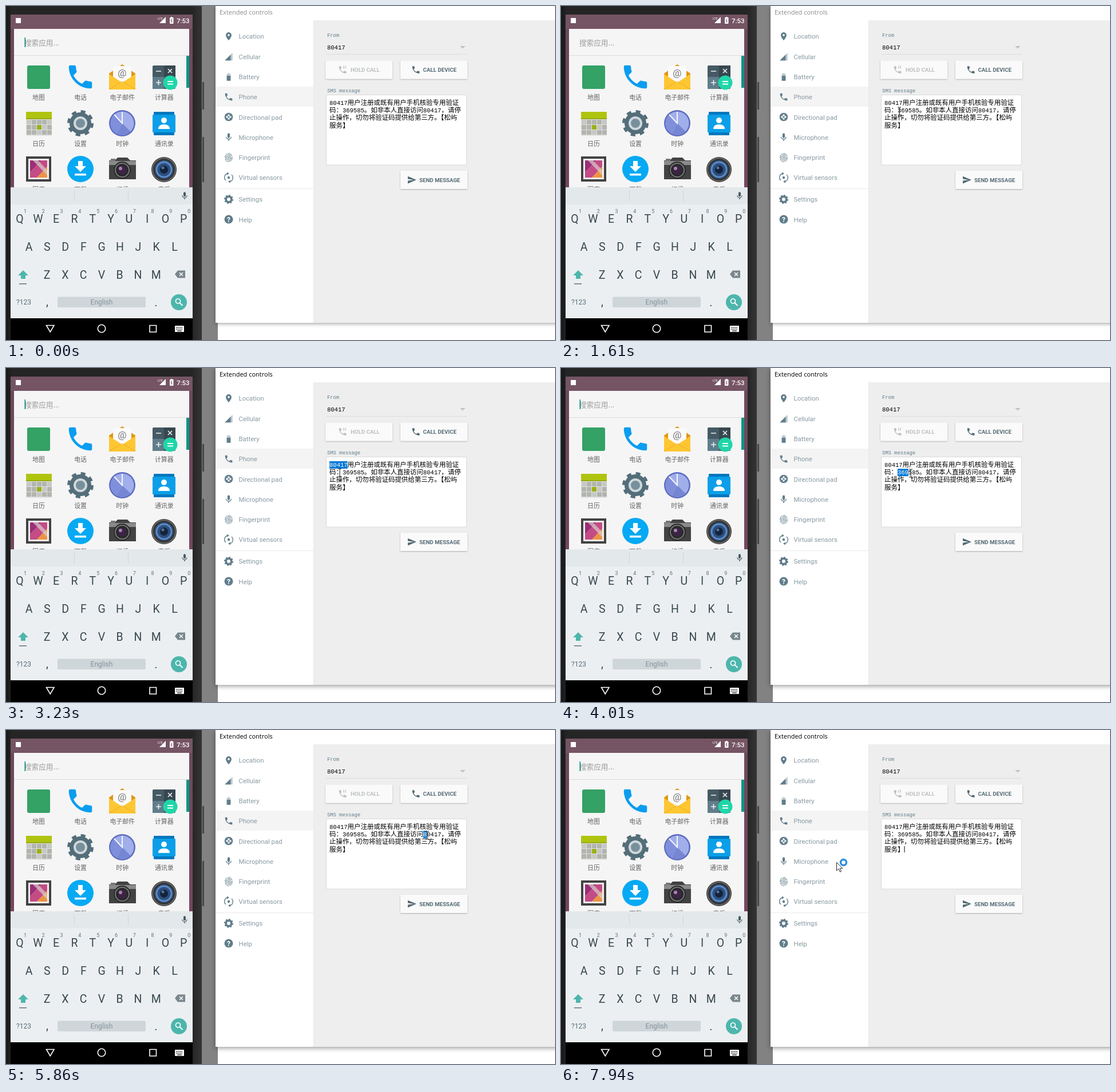
An HTML page for the animation above (8 s loop, 959 by 584 pixels).

```html
<!DOCTYPE html>
<html lang="zh">
<head>
<meta charset="utf-8">
<title>Extended controls</title>
<style>
html, body { margin: 0; width: 100%; height: 100%; overflow: hidden; background: #fff; }
svg { display: block; }
text { font-family: Roboto, "Noto Sans CJK SC", "Noto Sans CJK", sans-serif; white-space: pre; }
.cjk { font-family: "Noto Sans CJK SC", "Noto Sans CJK", sans-serif; }
.mono { font-family: "Liberation Mono", monospace; }
.title { font-family: "Open Sans", "Noto Sans", sans-serif; }
.sms { font-size: 11.45px; }
.sms .mono { font-size: 10.5px; }
</style>
</head>
<body>
<svg id="stage" width="959" height="584" viewBox="0 0 959 584" xmlns="http://www.w3.org/2000/svg"></svg>
<script>
const LOOP = 8000, WIDE = 11.45, NARROW = 6.3, LEFT = 565;

const glyphs = {
  phone: 'M6.62 10.79c1.44 2.83 3.76 5.14 6.59 6.59l2.2-2.2c.27-.27.67-.36 1.02-.24 1.12.37 2.33.57 3.57.57.55 0 1 .45 1 1V20c0 .55-.45 1-1 1C10.61 21 3 13.39 3 4c0-.55.45-1 1-1h3.5c.55 0 1 .45 1 1 0 1.25.2 2.45.57 3.57.11.35.03.74-.25 1.02z',
  pin: 'M12 2C8.13 2 5 5.13 5 9c0 5.25 7 13 7 13s7-7.75 7-13c0-3.87-3.13-7-7-7zm0 9.5a2.5 2.5 0 1 1 0-5 2.5 2.5 0 0 1 0 5z',
  mic: 'M12 14a3 3 0 0 0 3-3V5a3 3 0 0 0-6 0v6a3 3 0 0 0 3 3zm5.3-3c0 3-2.54 5.1-5.3 5.1S6.7 14 6.7 11H5c0 3.41 2.72 6.23 6 6.72V21h2v-3.28c3.28-.48 6-3.3 6-6.72z',
  send: 'M2 21l21-9L2 3v7l15 2-15 2z',
  cell: 'M2 22h20V2z',
  cellFull: 'M2 22h15V7z',
  battery: 'M10 2h4v2h3v18H7V4h3z',
  batteryFull: 'M7 9h10v13H7z',
  pause: 'M14 3h2v8h-2zM19 3h2v8h-2z'
};

const rect = (x, y, w, h, fill, more = '') => `<rect x="${x}" y="${y}" width="${w}" height="${h}" fill="${fill}" ${more}/>`;
const disc = (x, y, r, fill, more = '') => `<circle cx="${x}" cy="${y}" r="${r}" fill="${fill}" ${more}/>`;
const ring = (x, y, r, color, w, more = '') => disc(x, y, r, 'none', `stroke="${color}" stroke-width="${w}" ${more}`);
const path = (d, fill, more = '') => `<path d="${d}" fill="${fill}" ${more}/>`;
const line = (d, color, w = 1, more = '') => path(d, 'none', `stroke="${color}" stroke-width="${w}" ${more}`);
const text = (x, y, s, size, fill, more = '') => `<text x="${x}" y="${y}" font-size="${size}" fill="${fill}" ${more}>${s}</text>`;
const mid = 'text-anchor="middle"';
const glyph = (name, cx, cy, size, fill) =>
  `<g transform="translate(${cx - size / 2} ${cy - size / 2}) scale(${size / 24})">${path(glyphs[name], fill)}</g>`;
const gear = (x, y, r, fill, hole) => {
  const tooth = 2 * Math.PI * r * 0.87 / 16;
  return disc(x, y, r * 0.83, fill) + ring(x, y, r * 0.87, fill, r * 0.26, `stroke-dasharray="${tooth}"`) + disc(x, y, r * 0.37, hole);
};

function appIcons() {
  const dark = '#455a64';
  let calendar = rect(35, 185, 45, 42, '#e0e0e0') + rect(35, 185, 45, 11, '#afc40f') + rect(35, 196, 45, 2, '#98aa13');
  for (let r = 0; r < 3; r++) for (let c = 0; c < 5; c++)
    calendar += rect(36 + c * 9, 199 + r * 9, 8, 8, (r === 1 && c === 2) ? '#9cb014' : (r + c) % 4 === 0 ? '#c6c8c3' : '#b2b5ae');
  return rect(37, 104, 40, 41, '#34a165', 'rx="3"')
    + glyph('phone', 130, 124, 54, '#0a9df0')
    + path('M180 118L203 102l23 16v28h-46z', '#e09612') + rect(187, 105, 32, 32, '#fafafa', 'rx="2"')
    + text(203, 123, '@', 17, '#757575', mid)
    + path('M180 119l23 15 23-15v25q0 2-2 2h-42q-2 0-2-2z', '#fdc632') + line('M181 145l22-13 22 13', '#eab023')
    + rect(256, 104, 40, 41, dark, 'rx="2"') + rect(276, 104, 20, 20, '#37474f') + rect(256, 124, 20, 21, '#607d8b')
    + line('M262 114h9M262 134h9M266.5 129.500v9M283 110l7 7m0-7l-7 7', '#eceff1', 1.7)
    + disc(287, 134, 12.5, '#1fd6a9') + line('M282 132h10m-10 4.500h10', '#fff', 2)
    + calendar
    + gear(130, 205, 23, '#546e7a', '#78909c') + ring(130, 205, 10, '#cfd8dc', 4)
    + disc(203, 205, 23, '#5c6bc0') + disc(203, 205, 20.5, '#a0aeea')
    + path('M203 205L189 190A20.500 20.500 0 0 0 194 223.500z', '#7f8fdc') + path('M203 205l14.500 14.500a20.500 20.500 0 0 1-23.500 4z', '#7686d2')
    + line('M189 190l14 15V185', '#f3f4fb', 2)
    + rect(258, 185, 36, 41, '#0277bd', 'rx="1"') + rect(256, 190, 40, 31, '#0a9fe8', 'rx="1.500"')
    + disc(276, 200, 5, '#fff') + path('M266 215q0-8 10-8t10 8z', '#fff')
    + rect(35, 263, 44, 44, '#424242') + rect(39, 267, 36, 36, '#f2f0ee')
    + path('M42 270h20L42 291z', '#9b2f79') + path('M62 270h10v11L54 300H42v-9z', '#c44b85')
    + path('M72 281v19H54z', '#ed9344') + path('M47 270h9l16 17v9z', '#d8cfcb', 'opacity=".7"')
    + disc(130, 285, 23, '#06a9f3') + path('M126 271h8v9h6l-10 10-10-10h6z', '#fff') + rect(120, 293, 20, 3.5, '#fff')
    + path('M190 270l5-5h17l5 5h10v33h-47v-33z', '#424242') + rect(180, 271, 47, 7, '#8a8a8a') + rect(183, 267, 8, 4, '#777')
    + disc(203, 287, 15, '#292929') + ring(203, 287, 12, '#777', 2) + disc(203, 287, 8, '#3c2444') + disc(200, 284, 3, '#a586b0')
    + disc(276, 286, 22, '#353535') + ring(276, 286, 20, '#686868', 2) + disc(276, 286, 16, '#2d4f7f')
    + ring(276, 286, 13, '#5b8bc7', 3) + disc(276, 286, 7, '#14233a') + disc(274, 283, 2.5, '#54749f');
}

function keyboard() {
  const ink = '#37474f';
  let s = rect(8, 317, 318, 229, '#eceff1') + rect(8, 317, 318, 30, '#e3e8eb')
    + line('M119.500 322v20M213.500 322v20', '#cfd6da') + glyph('mic', 312, 332, 16, '#455a64');
  [['QWERTYUIOP', 24, 379], ['ASDFGHJKL', 40, 428], ['ZXCVBNM', 71.5, 476.5]].forEach(([keys, x, y], row) =>
    [...keys].forEach((k, i) => {
      const cx = x + i * 31.8;
      s += text(cx, y, k, 19.5, ink, mid);
      if (!row) s += text(cx + 9.5, 362, (i + 1) % 10, 9, '#607079', mid);
    }));
  return s + path('M30 462l9 9h-5v6h-8v-6h-5z', '#4db6ac') + rect(23, 485, 13, 1.5, '#607079')
    + path('M295 469l5-6.500h13v13h-13z', '#78868d') + line('M303 466l6 6m0-6l-6 6', '#fff', 1.5)
    + text(18, 522, '?123', 12, '#546e7a') + text(72, 524, ',', 20, ink, mid) + text(262, 525, '.', 20, ink, mid)
    + rect(90, 508.5, 154, 18.5, '#cfd6da', 'rx="2"') + text(167, 522, 'English', 12, '#849198', mid)
    + disc(302, 518, 14, '#4db6ac') + ring(300.5, 516, 4, '#fff', 1.7) + line('M303.500 519l5 5', '#fff', 2);
}

function device() {
  let s = rect(0, 0, 370, 584, '#828282') + rect(0, 0, 342, 584, 'url(#bezel)')
    + rect(343, 133, 3, 48, '#484848') + rect(343, 229, 3, 79, '#484848')
    + rect(8, 15, 318, 302, 'url(#wall)') + rect(8, 15, 318, 25, '#755463')
    + rect(17, 21, 9, 9, '#fff')
    + text(265, 24, 'LTE', 5.5, '#fff') + path('M268 30h11V19z', '#fff') + rect(286, 20, 6.5, 11, '#fff', 'rx="1"')
    + rect(288, 19, 2.5, 2, '#fff') + line('M290 22l-2 4h2l-1 3', '#755463')
    + text(298, 29.5, '7:53', 11.5, '#fff', 'font-weight="500"')
    + rect(14, 40, 306, 277, '#f5f5f5') + line('M14 86.500h306', '#dcdcdc') + rect(315, 87, 5, 56, '#0b9684')
    + text(32, 68.5, '搜索应用...', 12.6, '#9b9b9b', 'class="cjk"') + appIcons();
  ['地图 电话 电子邮件 计算器', '日历 设置 时钟 通讯录', '图库 下载 相机 音乐'].forEach((row, r) =>
    row.split(' ').forEach((name, c) => {
      s += text(57 + c * 73.1, 164 + r * 80.5, name, 10.9, '#646464', `class="cjk" ${mid}`);
    }));
  return s + keyboard() + rect(8, 546, 318, 38, '#000')
    + line('M70.500 558.500h13.500l-6.750 11.500z', '#fff', 1.6) + ring(167, 564, 6.7, '#fff', 1.6)
    + line('M251 558.500h11.500v11.500h-11.500z', '#fff', 1.6)
    + rect(295, 559, 16, 11, '#fff', 'rx="1"') + line('M297 562h12m-12 3h12', '#000', 1.4, 'stroke-dasharray="1.3 1.1"') + line('M299 568h8', '#000', 1.2);
}

function button(x, y, label, labelX, icon, iconX, ink) {
  return rect(x, y, 117, 32, '#fafafa', 'rx="1.500" filter="url(#lift)"')
    + glyph(icon, iconX, y + 16, 17, ink) + text(labelX, y + 19.5, label, 9.7, ink, 'font-weight="700"');
}

function sideIcons() {
  const c = '#607d8b', pale = '#b9c7ce', x = 389;
  let s = glyph('pin', x, 53, 17, c) + glyph('cell', x, 88.5, 16, pale) + glyph('cellFull', x, 88.5, 16, c)
    + glyph('battery', x, 124, 16, pale) + glyph('batteryFull', x, 124, 16, c) + glyph('phone', x, 159, 17, c)
    + disc(x, 194, 7.3, c) + line('M389 189.500v9M384.500 194h9', '#fff', 3) + disc(x, 194, 1.6, c)
    + glyph('mic', x, 229.5, 17, c);
  for (const r of [1.2, 3.2, 5.1, 6.8])
    s += `<ellipse cx="${x}" cy="265" rx="${r * 0.92}" ry="${r * 1.08}" fill="none" stroke="${c}" stroke-width=".9" stroke-dasharray="9 1.200"/>`;
  return s + disc(x, 300, 2.2, c) + line('M384 305a7 7 0 0 1 3-12M394 295a7 7 0 0 1-3 12', c, 1.4)
    + path('M386 290.500l4 2.500-4 2.500zM392 304.500v5l-4-2.500z', c)
    + gear(x, 338, 8, c, '#fff') + disc(x, 373, 7.5, c) + text(x, 377.5, '?', 12, '#fff', `${mid} font-weight="700"`);
}

function controls() {
  const ink = '#546a75', off = '#bcbfc0';
  let s = rect(366, 0, 600, 554, '#fff', 'id="frame"') + rect(538, 25, 421, 529, '#eee')
    + line('M537.500 25v529', '#e8e8e8') + rect(366, 141, 171, 35, '#f4f4f4') + line('M366 319.500h171', '#e9e9e9')
    + text(373, 15, 'Extended controls', 11, '#000', 'id="title" class="title"') + sideIcons();
  const items = 'Location,Cellular,Battery,Phone,Directional pad,Microphone,Fingerprint,Virtual sensors,Settings,Help';
  items.split(',').forEach((name, i) => {
    s += text(406.5, 57.3 + i * 35.3 + (i > 7 ? 2.6 : 0), name, 11.4, '#8799a2');
  });
  return s + text(561, 54, 'From', 8.8, '#607d8b', 'class="mono"') + text(561, 76, '80417', 10.5, '#000', 'class="mono"')
    + path('M793 70h9.500l-4.750 4.500z', '#c2c2c2') + line('M559 84.500h246', '#dcdcdc')
    + button(558, 95.5, 'HOLD CALL', 602, 'phone', 588, off) + glyph('pause', 588, 110, 15, off)
    + button(689, 95.5, 'CALL DEVICE', 728.5, 'phone', 716, ink)
    + text(561, 151, 'SMS message', 8.8, '#607d8b', 'class="mono"')
    + rect(559.5, 155.5, 245, 122.5, '#fff', 'stroke="#dadada"')
    + button(689, 288, 'SEND MESSAGE', 722, 'send', 709, ink);
}

const rows = ['80417用户注册或既有用户手机核验专用验证', '码：369585。如非本人直接访问80417，请停', '止操作，切勿将验证码提供给第三方。【松屿', '服务】'];
const isDigit = ch => ch >= '0' && ch <= '9';
const edges = rows.map(row => [...row].reduce((e, ch) => [...e, e.at(-1) + (isDigit(ch) ? NARROW : WIDE)], [LEFT]));
const message = rows.map((row, r) => `<text class="sms cjk" x="${LEFT}" y="${173 + r * 13.2}">`
  + [...row].map(ch => `<tspan class="${isDigit(ch) ? 'mono' : 'cjk'}">${ch}</tspan>`).join('') + '</text>').join('');

const defs = `<defs>
<linearGradient id="bezel"><stop offset="0" stop-color="#171717"/><stop offset=".03" stop-color="#252525"/><stop offset=".95" stop-color="#252525"/><stop offset="1" stop-color="#353535"/></linearGradient>
<linearGradient id="wall" x2="0" y2="1"><stop offset="0" stop-color="#6b4a5a"/><stop offset="1" stop-color="#74465f"/></linearGradient>
<filter id="lift" x="-10%" y="-30%" width="120%" height="170%"><feDropShadow dx="0" dy="1" stdDeviation="1.200" flood-opacity=".28"/></filter>
</defs>`;

const ibeam = 'M-3-7h2.500l.5.500.5-.5H3M0-6.500v13M-3 7h2.500l.5-.5.5.500H3';
const arrow = 'M.5.500v14.500l3.400-3.200 2.400 5.400 2.200-1-2.400-5.200h4.700z';
const stage = document.getElementById('stage');
stage.innerHTML = defs + rect(0, 0, 959, 584, '#fff') + device() + controls()
  + rect(0, 0, 0, 13, '#0078d7', 'id="mark"') + message
  + rect(32.5, 55, 1.5, 17, '#0b9684', 'id="searchCaret"') + rect(599.5, 203, 1, 11, '#000', 'id="textCaret"')
  + `<g id="pointer"><g id="beam">${line(ibeam, '#111', 1)}</g><g id="arrow">${path(arrow, '#fff', 'stroke="#111" stroke-width=".9"')}</g>`
  + `<g id="busy">${ring(12.5, 0.5, 5, '#2f8fe0', 3.5)}</g></g>`;

const $ = id => document.getElementById(id);
const show = (id, on) => $(id).setAttribute('visibility', on ? 'inherit' : 'hidden');
const lines = [...document.querySelectorAll('.sms')];

// time, x, y
const track = [
  [70, 861, 566], [400, 728, 330], [820, 601, 192], [1130, 600, 191], [1440, 592, 185], [1610, 591, 184],
  [2000, 599, 184], [2140, 598, 173], [2310, 597, 170], [2460, 585, 170], [2700, 566, 170], [3080, 578, 178],
  [3460, 590, 191], [3620, 588, 184], [4010, 611, 184], [4410, 626, 184], [4700, 632, 184], [5010, 717, 184],
  [5470, 732, 188], [5560, 732, 184], [5780, 729, 184], [6240, 766, 184], [6780, 766, 184], [7000, 785, 225],
  [7220, 752, 294], [7400, 752, 285], [7560, 745, 240], [7640, 715, 238], [7940, 481, 231], [8000, 481, 231]
];
// press, release, cleared, row, anchor
const drags = [[2310, 2700, 3620, 0, 5], [3620, 4470, 5780, 1, 2], [5780, 6240, 7640, 1, 17]];

function pointerAt(t) {
  const i = Math.max(1, track.findIndex(p => p[0] >= t));
  const [a, b] = [track[i - 1], track[i]];
  const k = Math.max(0, (t - a[0]) / (b[0] - a[0]));
  return [a[1] + (b[1] - a[1]) * k, a[2] + (b[2] - a[2]) * k];
}

function drawSelection(t) {
  const drag = drags.find(d => t >= d[0] && t < d[2]);
  let row = -1, from = 0, to = 0;
  if (drag) {
    row = drag[3];
    const x = pointerAt(Math.min(t, drag[1]))[0];
    const at = Math.max(0, edges[row].filter(e => e <= x).length - 1);
    from = Math.min(at, drag[4]);
    to = Math.max(at, drag[4]);
    $('mark').setAttribute('x', edges[row][from]);
    $('mark').setAttribute('y', 163 + row * 13.2);
    $('mark').setAttribute('width', edges[row][to] - edges[row][from]);
  }
  show('mark', drag);
  lines.forEach((el, r) => [...el.children].forEach((c, i) =>
    c.setAttribute('fill', r === row && i >= from && i < to ? '#fff' : '#000')));
}

function draw(t) {
  const [x, y] = pointerAt(t);
  const inBox = x > 559 && x < 805 && y > 155 && y < 278;
  const active = t >= 2310;
  $('pointer').setAttribute('transform', `translate(${Math.round(x)} ${Math.round(y)})`);
  show('pointer', t >= 70);
  show('beam', inBox);
  show('arrow', !inBox);
  show('busy', !inBox && t > 7640);
  show('searchCaret', (t + 260) % 1000 < 500);
  show('textCaret', t >= 7640);
  $('title').setAttribute('fill', active ? '#000' : '#8b8b8b');
  $('frame').style.filter = `drop-shadow(0 2px ${active ? 4 : 3}px rgba(0,0,0,${active ? 0.42 : 0.34}))`;
  drawSelection(t);
}

function tick() {
  draw(performance.now() % LOOP);
  requestAnimationFrame(tick);
}
tick();
</script>
</body>
</html>
```
